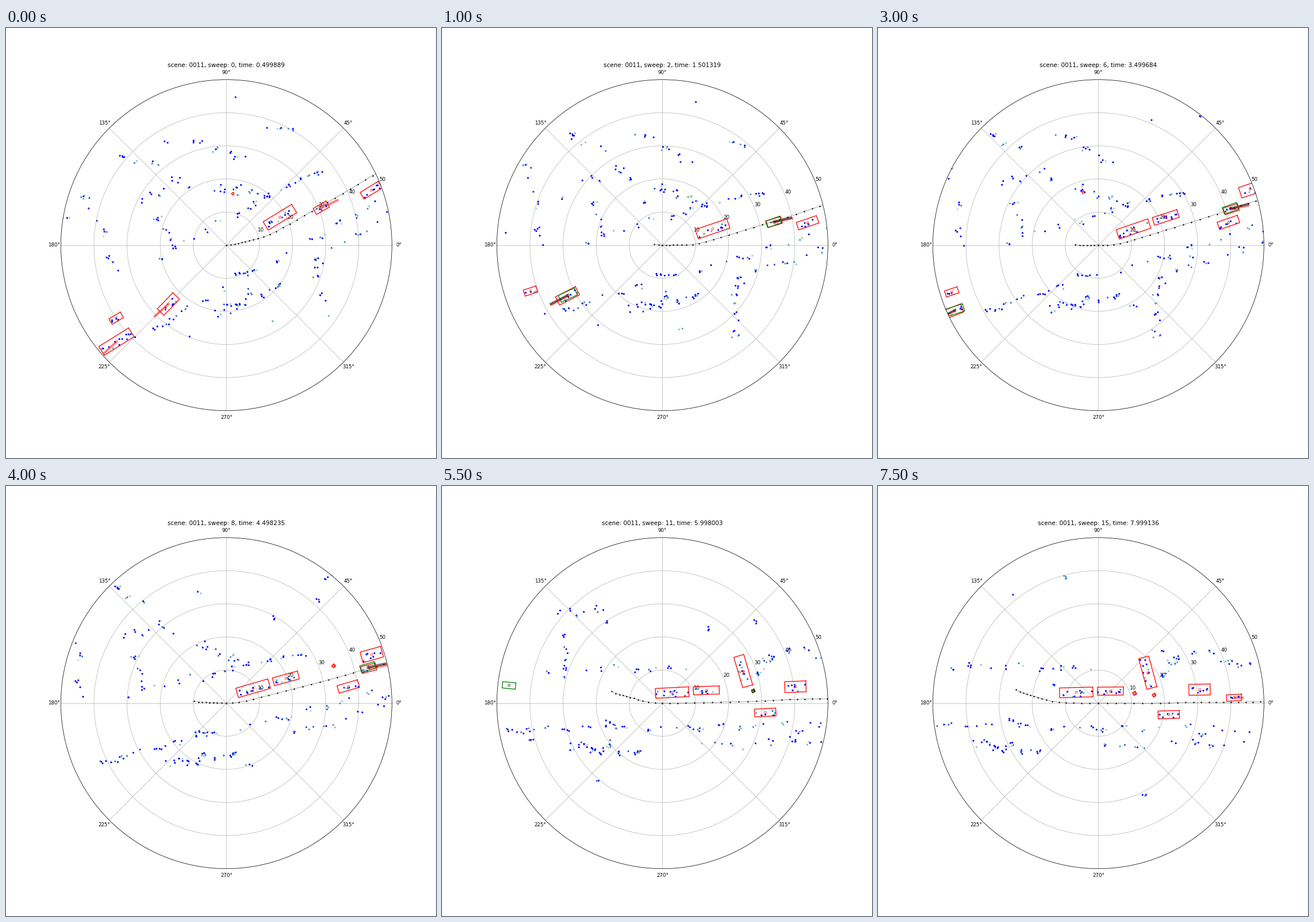
Write a matplotlib script that moves like this. It is 748 px wide and 748 px high and loops after 8 s.

```python
from collections import namedtuple

import numpy as np
import matplotlib.pyplot as plt
from matplotlib.animation import FuncAnimation
from matplotlib.colors import LinearSegmentedColormap

SIZE, SWEEPS, LAST = 748, 16, 15
PX_PER_M = 5.76

TIMES = [0.499889, 0.999873, 1.501319, 1.951248, 2.451271, 2.999702, 3.499684, 3.998761,
         4.498235, 4.99821, 5.498117, 5.998003, 6.498421, 6.999085, 7.499161, 7.999136]

# Drive: sweep, heading in degrees, distance covered per sweep
DRIVE = [(0, -30, 7.9), (1, -23.5, 7.3), (2, -17.2, 6.3), (4, -15.3, 6.3), (7, -18.5, 7.6),
         (9, -10.7, 11.3), (11, -1.4, 12.8), (15, 0, 15.2), (20, -0.3, 15.6), (23, 2, 14.8),
         (29, -0.5, 12.7), (36, 2, 13)]
KEYS, TURNS, STEPS = np.array(DRIVE).T


def heading(k):
    return np.radians(np.interp(k, KEYS, TURNS))


mid = np.arange(36) + 0.5
PATH = np.append(0, np.cumsum(np.interp(mid, KEYS, STEPS) * np.exp(1j * heading(mid))))
PATH -= PATH[LAST]


def to_view(world, k):
    return (world - PATH[k]) * np.exp(-1j * heading(k))


def polar(z):
    return np.angle(z), np.abs(z) / PX_PER_M


# Kerbs and walls that reflect: two ends, number of reflectors, sweeps in sight
ROWS = [
    (-365 - 36j, -100 - 37j, 11, 0, 15), (-95 - 42j, 280 - 48j, 16, 0, 15),
    (-225 - 72j, -95 - 82j, 14, 0, 15), (0 - 73j, 265 - 72j, 11, 0, 15),
    (-15 - 72j, -62 - 178j, 8, 0, 7), (-120 + 124j, -30 + 56j, 11, 0, 8),
    (-260 + 66j, -5 + 62j, 11, 0, 15), (-332 + 70j, -312 + 240j, 9, 0, 11),
    (-231 + 130j, -219 + 72j, 6, 0, 12), (-236 + 264j, -178 + 206j, 4, 0, 8),
    (-235 + 163j, -140 + 156j, 8, 0, 13), (-120 + 226j, -37 + 135j, 8, 0, 6),
    (26 + 155j, 60 + 135j, 3, 0, 5), (0 + 58j, 70 + 53j, 6, 0, 9),
    (110 + 46j, 140 + 80j, 8, 11, 15), (165 + 88j, 270 + 66j, 7, 11, 15),
]


def build_echoes():
    rng = np.random.default_rng(11)
    spots, spans = [], []
    for a, b, n, first, last in ROWS:
        t = (np.arange(n) + rng.uniform(0.2, 0.8, n)) / n
        spots.extend(a + (b - a) * t + rng.normal(0, 4, n) + 1j * rng.normal(0, 4, n))
        spans.extend([(first, last)] * n)
    for _ in range(50):
        spots.append(rng.uniform(-400, 320) + 1j * rng.uniform(-180, 260))
        first = rng.integers(-3, SWEEPS)
        spans.append((first, first + 4))
    count = rng.integers(1, 5, len(spots))
    n = count.sum()
    spread = rng.normal(0, 3.5, n) + 1j * rng.normal(0, 2.5, n)
    shade = np.where(rng.random(n) < 0.52, 0, rng.random(n))
    return np.repeat(spots, count) + spread, np.repeat(spans, count, axis=0).T, shade


ECHOES, (SEEN_FROM, SEEN_TO), SHADE = build_echoes()

Track = namedtuple("Track", "color start length width angle first last step drag arrow turn",
                   defaults=(0, 0, 0, 0))
TRACKS = [
    # parked
    Track("red", -38.5 + 18.7j, 58, 17, 1.5, 0, 15),
    Track("red", 21 + 21j, 45, 14, 0.5, 5, 15),
    Track("red", 122.5 - 20j, 37, 13.5, 1.5, 0, 15),
    Track("red", 176 + 23.5j, 37, 19, 1, 6, 15),
    Track("red", 86 + 53j, 55, 18, -75, 10, 15, arrow=1 - 3j),
    Track("red", -373 + 9j, 23, 11, 1, 0, 7),
    Track("red", -393 - 26.5j, 61, 18, 2, 0, 0, arrow=-30 - 7j),
    Track("green", -322 + 38j, 23, 11, -7, 11, 11),
    # car ahead
    Track("red", 32 - 3j, 26, 12, 0, 0, 9, 18.2 + 0.6j, -0.2, 33 - 3j),
    Track("green", 31 - 3j, 26, 12, 2, 1, 9, 18.2 + 0.9j, -0.2, 33 - 2j),
    Track("red", 108.5 + 9.5j, 26, 11, 3, 13, 15, 8.5, arrow=17),
    # car behind
    Track("red", -282 - 15j, 39, 16, 16, 0, 3, -16 - 1.5j, 0, -33 - 7j, -3),
    Track("red", -282 - 15j, 28, 15, 16, 5, 6, -16 - 1.5j, 0, -24 - 4j, -2),
    Track("green", -281 - 14j, 31, 13, 12, 1, 6, -16 - 1.5j, 0, -35 - 6j, -2),
    # on foot
    Track("red", 118 + 29j, 5, 5, 30, 8, 15, -1.4 - 1j, 0, 3 + 1j),
    Track("green", 118 + 29j, 5, 5, 20, 11, 11, -1.4 - 1j, 0, 3 + 2j),
    Track("red", 85.5 + 24.5j, 5.5, 5.5, 30, 13, 15, -1.5 - 0.5j, 0, 3 - 2j),
    Track("red", -89 + 95j, 3.5, 3.5, 0, 0, 0),
    Track("red", -103 + 106j, 3.5, 3.5, 0, 6, 6),
]

CORNERS = np.array([1 + 1j, -1 + 1j, -1 - 1j, 1 - 1j, 1 + 1j]) / 2
GAP = complex(np.nan, np.nan)


def rect(center, length, width, angle):
    return center + (CORNERS.real * length + 1j * CORNERS.imag * width) * np.exp(1j * angle)


def joined(parts):
    """Chain polylines with gaps between them."""
    return np.concatenate([np.append(p, GAP) for p in parts]) if parts else np.array([GAP])


fig = plt.figure(figsize=(12, 12), dpi=SIZE / 12)
ax = fig.add_subplot(projection="polar")
shades = LinearSegmentedColormap.from_list("echo", ["#0000ff", "#4088b0", "#a4e2c6"])

dots = ax.scatter([], [], s=13, linewidths=0, zorder=2)
path, = ax.plot([], [], "k.-", lw=0.4, ms=3.4, zorder=2.1)
lines = {}
for color, ink in (("red", "red"), ("green", "black")):
    lines[color, "arrow"], = ax.plot([], [], color=ink, lw=4.6, alpha=0.5,
                                     solid_capstyle="butt", zorder=2.3)
    lines[color, "box"], = ax.plot([], [], color=color, lw=1.5, zorder=2.4)
    lines[color, "mark"], = ax.plot([], [], color=ink, lw=0.7, zorder=2.5)
ax.set_rlim(0, 50)
ax.set_rticks([10, 20, 30, 40, 50])
title = ax.set_title(" ")


def update(k):
    rng = np.random.default_rng(100 + k)
    seen = (SEEN_FROM <= k) & (k <= SEEN_TO) & (rng.random(len(ECHOES)) < 0.85)
    points, shade = [to_view(ECHOES[seen], k)], [SHADE[seen]]

    parts = {key: [] for key in lines}
    for t in TRACKS:
        if not t.first <= k <= t.last:
            continue
        center = to_view(t.start + t.step * k + t.drag * k * k, k)
        angle = np.radians(t.angle + t.turn * k) - heading(k)
        parts[t.color, "box"].append(rect(center, t.length, t.width, angle))
        parts[t.color, "mark"].append(rect(center, 3.2, 3.2, angle))
        if t.arrow:
            tip = center + t.arrow * np.exp(-1j * heading(k))
            parts[t.color, "arrow"].append(np.array([center, tip]))
        if t.color == "red" and t.length > 20:
            n = int(t.length / 5)
            u = rng.uniform(-0.48, 0.48, n) * t.length
            v = rng.uniform(-0.45, 0.2, n) * t.width
            points.append(center + (u + 1j * v) * np.exp(1j * angle))
            shade.append(np.where(rng.random(n) < 0.6, 0, rng.random(n)))

    dots.set_offsets(np.column_stack(polar(np.concatenate(points))))
    dots.set_facecolor(shades(np.concatenate(shade)))
    path.set_data(*polar(to_view(PATH, k)))
    for key, line in lines.items():
        line.set_data(*polar(joined(parts[key])))
    title.set_text(f"scene: 0011, sweep: {k}, time: {TIMES[k]}")
    return [dots, path, title, *lines.values()]


# namedtuple rows and seeded noise make every sweep depend on its number alone
anim = FuncAnimation(fig, update, frames=SWEEPS, interval=500, repeat=True,
                     repeat_delay=0, blit=False)
plt.show()
```
